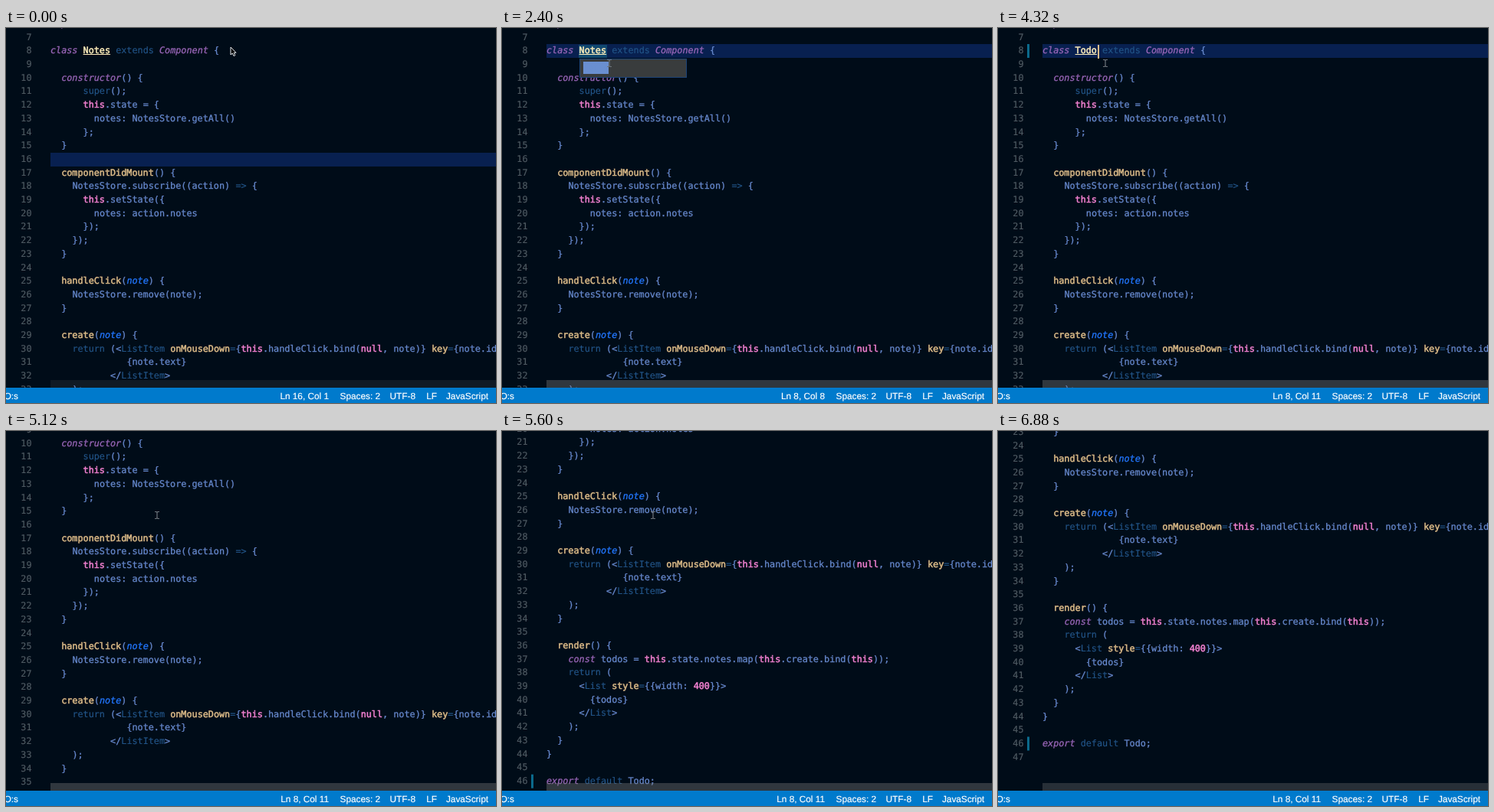
Recreate the animation shown at these times as an HTML page. Size 639 by 490 pixels, loop 7200 ms.

```html
<!DOCTYPE html>
<html lang="en">
<head>
<meta charset="utf-8">
<title>Rename symbol</title>
<style>
  html, body { margin: 0; width: 100%; height: 100%; overflow: hidden; background: #000c18; }
  #stage { position: absolute; left: 0; top: 0; width: 639px; height: 490px; overflow: hidden; background: #000c18;
    font: 11.79px/17.7px "DejaVu Sans Mono", monospace; color: #6688cc; text-rendering: geometricPrecision; }
  #stage div, #stage span, #stage svg { position: absolute; }
  #stage span { white-space: pre; top: 0; }
  #scroll, #code, #marks { left: 0; top: 0; width: 639px; height: 0; }
  #arrow, #beam { left: 0; top: 0; }
  .line { left: 58px; height: 17.7px; -webkit-text-stroke: .3px; }
  .num { left: -58px; width: 33.5px; text-align: right; color: #505b63; -webkit-text-stroke: .15px; }
  .v { color: #9966b8; font-style: italic; }
  .k { color: #225588; -webkit-text-stroke: .15px; }
  .p { color: #f280d0; -webkit-text-stroke: .5px; }
  .f { color: #ddbb88; -webkit-text-stroke: .5px; }
  .a { color: #2277ff; font-style: italic; }
  .u { color: #ffeebb; text-decoration: underline; -webkit-text-stroke: .5px; }
  #row { left: 58px; width: 581px; height: 18px; background: #082050; }
  #word { left: 100px; top: 22px; width: 37px; height: 17px; background: #10486f; }
  #caret { left: 130px; top: 22px; width: 2px; height: 18px; background: #ddbb88; }
  .mark { left: 38px; width: 3px; height: 18px; background: #0b6a8c; }
  #box { left: 101px; top: 40px; width: 138px; height: 23px; border: 1px solid #1d4478; background: #393c3d; font-size: 11px; }
  #stage #field { left: 4px; top: 3px; height: 16px; line-height: 16px; }
  #field.all { background: #6a8fd0; color: #6a8fd0; }
  #bar { left: 58px; top: 460px; width: 581px; height: 10px; background: #797979; }
  #status { left: 0; top: 470px; width: 639px; height: 20px; background: #007acc; color: #fff;
    font: 11.8px/22px "Liberation Sans", Arial, sans-serif; -webkit-text-stroke: .2px; }
</style>
</head>
<body>
<div id="stage">
  <div id="scroll">
    <div id="row"></div>
    <div id="word"></div>
    <div id="code"></div>
    <div id="caret"></div>
    <div id="marks"></div>
  </div>
  <div id="box"><span id="field"></span></div>
  <div id="bar"></div>
  <svg id="arrow" width="10" height="14"><path d="M1 1V11L3.3 9L5 12.5L6.8 11.7L5.2 8.3H8Z" fill="#000" stroke="#e8ecf0"/></svg>
  <svg id="beam" width="8" height="12"><path d="M1 1.5H3L4 2.5L5 1.5H7M4 2V10M1 10.5H3L4 9.5L5 10.5H7" fill="none" stroke="#6d747b" stroke-width="1.2"/></svg>
  <div id="status"></div>
</div>
<script>
const LOOP = 7200, CHAR = 7.1, ROW = 17.7, FIRST = 6;
const $ = id => document.getElementById(id);
const lineTop = n => 21.3 + (n - 8) * ROW;

const source = name => `import NotesStore from './NotesStore';

class ${name} extends Component {

  constructor() {
      super();
      this.state = {
        notes: NotesStore.getAll()
      };
  }

  componentDidMount() {
    NotesStore.subscribe((action) => {
      this.setState({
        notes: action.notes
      });
    });
  }

  handleClick(note) {
    NotesStore.remove(note);
  }

  create(note) {
    return (<ListItem onMouseDown={this.handleClick.bind(null, note)} key={note.id}>
              {note.text}
           </ListItem>
    );
  }

  render() {
    const todos = this.state.notes.map(this.create.bind(this));
    return (
      <List style={{width: 400}}>
        {todos}
      </List>
    );
  }
}

export default ${name};
`;

const rules = new RegExp([
  "(?<u>(?<=class )\\w+)",
  "(?<v>\\b(?:class|Component|constructor|const|import|export)\\b)",
  "(?<k>\\b(?:extends|super|return|default|from|ListItem|List)\\b|=>|=(?=\\{))",
  "(?<p>\\b(?:this|null|400)\\b)",
  "(?<f>(?<!\\.)\\b(?:componentDidMount|handleClick|create|render|onMouseDown|key|style)\\b)",
  "(?<a>\\bnote(?=\\) \\{))"
].join("|"), "g");

function add(parent, tag, cls, text, style) {
  const el = document.createElement(tag);
  el.className = cls;
  el.textContent = text;
  Object.assign(el.style, style);
  return parent.appendChild(el);
}

function drawLine(text, n) {
  const line = add($("code"), "div", "line", "", { top: lineTop(n) + "px" });
  add(line, "span", "num", n);
  const put = (part, col, cls) => {
    const lead = part.length - part.trimStart().length;
    if (part.trim()) add(line, "span", cls, part.trim(), { left: (col + lead) * CHAR + "px" });
  };
  let col = 0;
  for (const m of text.matchAll(rules)) {
    put(text.slice(col, m.index), col, "");
    put(m[0], m.index, Object.keys(m.groups).find(g => m.groups[g]));
    col = m.index + m[0].length;
  }
  put(text.slice(col), col, "");
}

let shownName;
function drawCode(name) {
  if (name === shownName) return;
  shownName = name;
  $("code").textContent = "";
  source(name).split("\n").forEach((text, i) => drawLine(text, FIRST + i));
}

for (const n of [8, 46]) add($("marks"), "div", "mark", "", { top: lineTop(n) + "px" });

add($("status"), "span", "", "O:s", { right: "623px" });
const place = add($("status"), "span", "", "", { right: "218px" });
[["Spaces: 2", 151], ["UTF-8", 105], ["LF", 77], ["JavaScript", 10]]
  .forEach(([text, right]) => add($("status"), "span", "", text, { right: right + "px" }));

// Each step changes only the listed parts of the state.
const start = { name: "Notes", row: 16, col: 1, word: false, caret: false, field: null,
  scroll: 0, bar: .13, arrow: [293, 24], beam: null };
const steps = [
  [160, { arrow: [232, 27] }],
  [320, { arrow: null, beam: [150, 30] }],
  [480, { beam: [112, 30], bar: .4 }],
  [640, { row: 8, col: 8, word: true }],
  [960, { beam: [124, 38] }],
  [1120, { beam: null }],
  [1600, { beam: [128, 40] }],
  [1760, { beam: [136, 44] }],
  [1920, { beam: [140, 46] }],
  [2240, { field: "Notes" }],
  [3040, { field: "T" }],
  [3360, { field: "To" }],
  [3520, { field: "Todo" }],
  [4000, { field: null, word: false }],
  [4160, { name: "Todo", col: 11 }],
  [4320, { caret: true }],
  [4640, { beam: [150, 58] }],
  [4800, { beam: [175, 85], caret: false }],
  [4960, { beam: [197, 110] }],
  [5120, { scroll: 49 }],
  [5280, { scroll: 98.2 }],
  [5440, { scroll: 172 }],
  [5600, { scroll: 245.3 }],
  [5760, { scroll: 275 }],
  [5920, { scroll: 290 }],
  [6080, { scroll: 294.5 }],
  [6720, { bar: .35 }],
  [6880, { beam: null, bar: .32 }]
];

const stateAt = t => Object.assign({}, start, ...steps.filter(s => s[0] <= t).map(s => s[1]));
const show = (el, on) => { el.style.display = on ? "block" : "none"; };
function point(el, pos, dx, dy) {
  show(el, pos);
  if (pos) el.style.transform = `translate(${pos[0] - dx}px, ${pos[1] - dy}px)`;
}

function draw(t) {
  const s = stateAt(t);
  drawCode(s.name);
  $("scroll").style.transform = `translateY(${-s.scroll}px)`;
  $("row").style.top = lineTop(s.row) + "px";
  show($("word"), s.word);
  show($("caret"), s.caret);
  show($("marks"), s.name === "Todo");
  show($("box"), s.field !== null);
  $("field").textContent = s.field || "";
  $("field").className = s.field === "Notes" ? "all" : "";
  $("bar").style.opacity = s.bar;
  place.textContent = `Ln ${s.row}, Col ${s.col}`;
  point($("arrow"), s.arrow, 1, 0);
  point($("beam"), s.beam, 4, 6);
}

const t0 = performance.now();
function tick() {
  draw((performance.now() - t0) % LOOP);
  requestAnimationFrame(tick);
}
tick();
</script>
</body>
</html>
```
